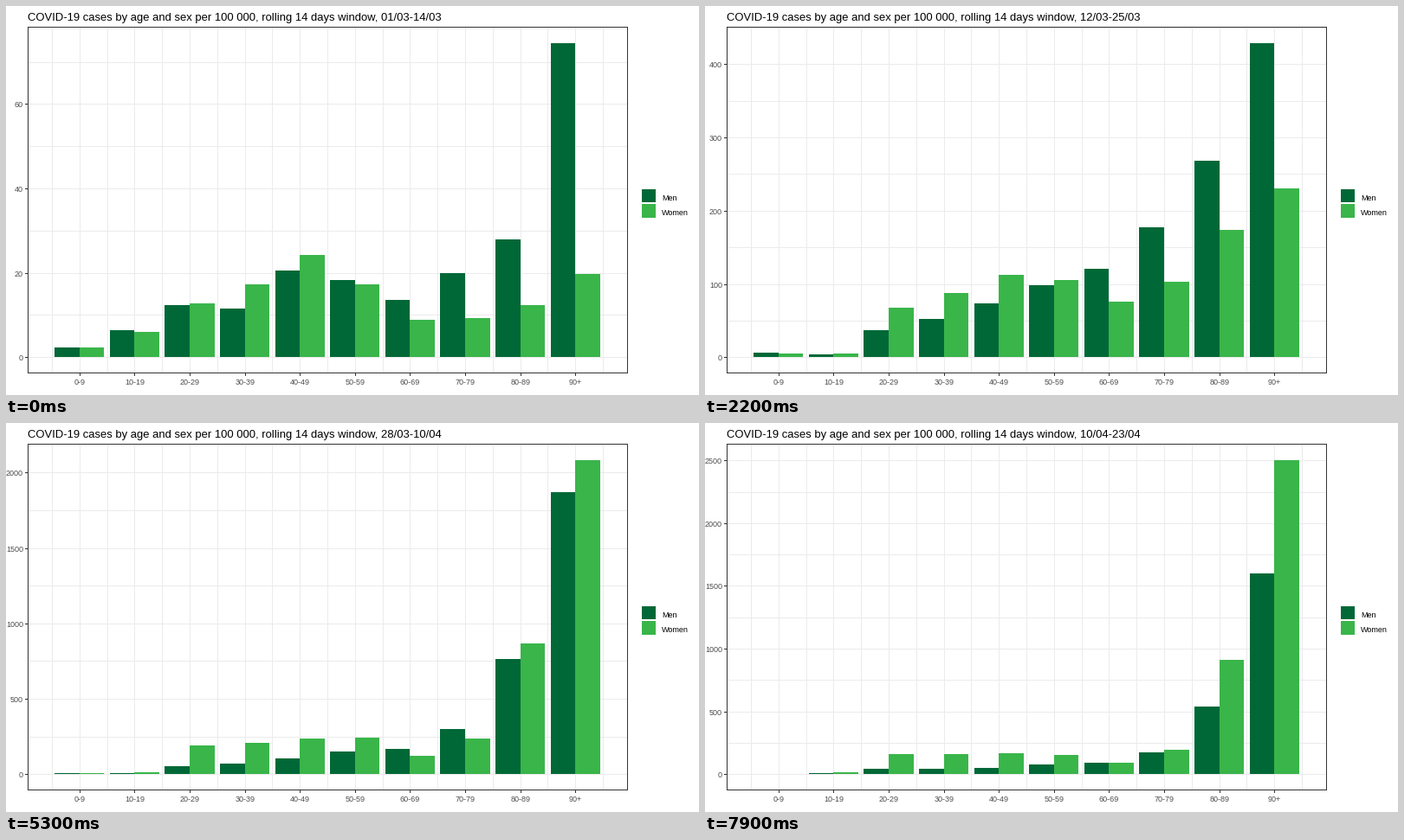
These frames come from a looping animation (800x450 px, 8000 ms). A matplotlib script:

```python
import numpy as np
import matplotlib.pyplot as plt
from matplotlib.animation import FuncAnimation
from matplotlib.patches import Rectangle

W, H, DPI = 800, 450, 100
FRAMES, INTERVAL = 80, 100
LEFT, RIGHT, TOP, BOTTOM = 25, 717, 24, 424
ZERO, SPAN = 406.3, 363.6            # baseline and height of the tallest bar
FIRST, PITCH, HALF = 84.8, 63.6, 28.6
GREEN, LIME = "#006837", "#39b54a"
GRID, FRAME, TICK_TEXT = "#ebebeb", "#333333", "#4d4d4d"
GROUPS = [f"{a}-{a + 9}" for a in range(0, 90, 10)] + ["90+"]

# Cases per 100 000 by age group, at a few moments of the loop
KEYS = np.array([0, 10, 22, 41, 53, 67, 79])
MEN = np.array([
    [2.3, 6.4, 12.4, 11.5, 20.6, 18.3, 13.6, 19.9, 27.9, 74.5],
    [3.3, 4.8, 21.4, 28.1, 40, 42, 46.7, 71, 96.8, 188],
    [6, 4, 37, 52.3, 73.5, 98.3, 120.7, 177.3, 268, 429],
    [7, 7, 52, 74.5, 119, 177, 209, 308, 602, 1163],
    [7, 8, 53, 70.5, 105, 151, 168, 300, 764, 1870],
    [5, 9, 47, 54, 69, 106, 121, 240, 708, 1980],
    [4.5, 8, 43, 43, 50, 78, 92, 174, 540, 1600]])
WOMEN = np.array([
    [2.3, 6, 12.8, 17.3, 24.3, 17.3, 8.9, 9.3, 12.4, 19.8],
    [3.8, 4.3, 27.6, 40, 55, 44.6, 28, 39.5, 60.6, 95.8],
    [5, 5, 67.6, 87.7, 112.4, 105.4, 76, 103, 173.8, 230.4],
    [7, 10, 151, 170, 199, 212, 135, 209, 513, 986],
    [7, 13, 191, 208, 237, 242, 122, 237, 867, 2084],
    [5, 17, 188, 188, 210, 203, 106, 225, 1028, 2703],
    [4.5, 16, 160, 160, 167, 154, 92, 195, 911, 2504]])

plt.rcParams["font.family"] = "Liberation Sans"
fig = plt.figure(figsize=(W / DPI, H / DPI), dpi=DPI, facecolor="white")
ax = fig.add_axes([0, 0, 1, 1])
ax.set(xlim=(0, W), ylim=(H, 0))
ax.axis("off")


def px(v):
    return int(np.floor(v + 0.5))


def box(x0, y0, x1, y1, color, z):
    return ax.add_patch(Rectangle((x0, y0), x1 - x0, y1 - y0,
                                  facecolor=color, linewidth=0, zorder=z))


def hline(y, x0, x1, color, z):
    return box(x0, y, x1, y + 1, color, z)


def vline(x, y0, y1, color, z):
    return box(x, y0, x + 1, y1, color, z)


def label(x, y, s, size, color, ha="left"):
    return ax.text(x, y, s, fontsize=size * 72 / DPI, color=color,
                   ha=ha, va="baseline", zorder=6)


def interpolate(table, t):
    """Cubic Hermite curve through the key rows."""
    slope = np.gradient(table, KEYS, axis=0, edge_order=2)
    i = min(np.searchsorted(KEYS, t, side="right") - 1, len(KEYS) - 2)
    h = KEYS[i + 1] - KEYS[i]
    u = (t - KEYS[i]) / h
    a, b = table[i], table[i + 1]
    curve = (a + (b - a) * u * u * (3 - 2 * u)
             + h * u * (1 - u) * ((1 - u) * slope[i] - u * slope[i + 1]))
    return np.maximum(curve, 0)


def tick_step(top):
    """Wilkinson's extended labelling for an axis that starts at zero."""
    lo, hi = -0.05 * top, 1.05 * top
    size = hi - lo
    best, result = -np.inf, top
    power = int(np.floor(np.log10(top)))
    for z in range(power - 2, power + 1):
        for rank, q in enumerate((1, 5, 2, 2.5, 4, 3)):
            step = q * 10.0 ** z
            for k in range(2, 13):
                end = step * (k - 1)
                cover = 1 - 0.5 * ((hi - end) ** 2 + lo ** 2) / (0.1 * size) ** 2
                ratio = (max(end, hi) - lo) / (4 * step)
                density = 2 - max(ratio, 1 / ratio)
                score = 0.25 * (1 - rank / 5) + 0.2 * cover + 0.5 * density
                if score > best:
                    best, result = score, step
    return result


def date(offset):
    """Day and month, counted from 1 March."""
    month, day = 3, offset + 1
    for length in (31, 30):
        if day > length:
            month, day = month + 1, day - length
        else:
            break
    return f"{day:02d}/{month:02d}"


# Fixed parts
for i, name in enumerate(GROUPS):
    x = px(FIRST + i * PITCH)
    vline(x, TOP, BOTTOM, GRID, 1)
    vline(x, BOTTOM + 1, BOTTOM + 4, FRAME, 4)
    label(x + 0.5, 438, name, 9, TICK_TEXT, "center")
for i in range(len(GROUPS) + 1):
    vline(px(FIRST + (i - 0.5) * PITCH), TOP, BOTTOM, GRID, 1)
for y in (TOP, BOTTOM):
    hline(y, LEFT, RIGHT + 1, FRAME, 5)
for x in (LEFT, RIGHT):
    vline(x, TOP, BOTTOM + 1, FRAME, 5)
box(734, 212, 750, 227, GREEN, 3)
box(734, 229, 750, 245, LIME, 3)
label(757, 225, "Men", 9, "black")
label(757, 242, "Women", 9, "black")
title = label(25, 17, "", 13, "black")

moving = []


def draw(n):
    while moving:
        moving.pop().remove()
    men, women = interpolate(MEN, n), interpolate(WOMEN, n)
    top = max(men.max(), women.max())

    def ypos(v):
        return px(ZERO - SPAN * v / top)

    step = tick_step(top)
    for i in range(int(2.1 * top / step) + 1):
        value = i * step / 2
        y = ypos(value)
        moving.append(hline(y, LEFT, RIGHT, GRID, 1))
        if i % 2 == 0:
            moving.append(hline(y, LEFT - 3, LEFT, FRAME, 4))
            moving.append(label(20, y + 4, f"{value:g}", 9, TICK_TEXT, "right"))

    base = px(ZERO)
    for i, (m, w) in enumerate(zip(men, women)):
        mid = FIRST + i * PITCH
        for x, v, color in ((mid - HALF, m, GREEN), (mid, w, LIME)):
            y = ypos(v)
            if y < base:
                moving.append(box(px(x), y, px(x + HALF), base, color, 3))

    day = (n + 1) // 2
    title.set_text("COVID-19 cases by age and sex per 100 000, rolling 14 days "
                   f"window, {date(day)}-{date(day + 13)}")
    return moving + [title]


anim = FuncAnimation(fig, draw, frames=FRAMES, interval=INTERVAL,
                     repeat=True, repeat_delay=0, blit=False)
plt.show()
```
